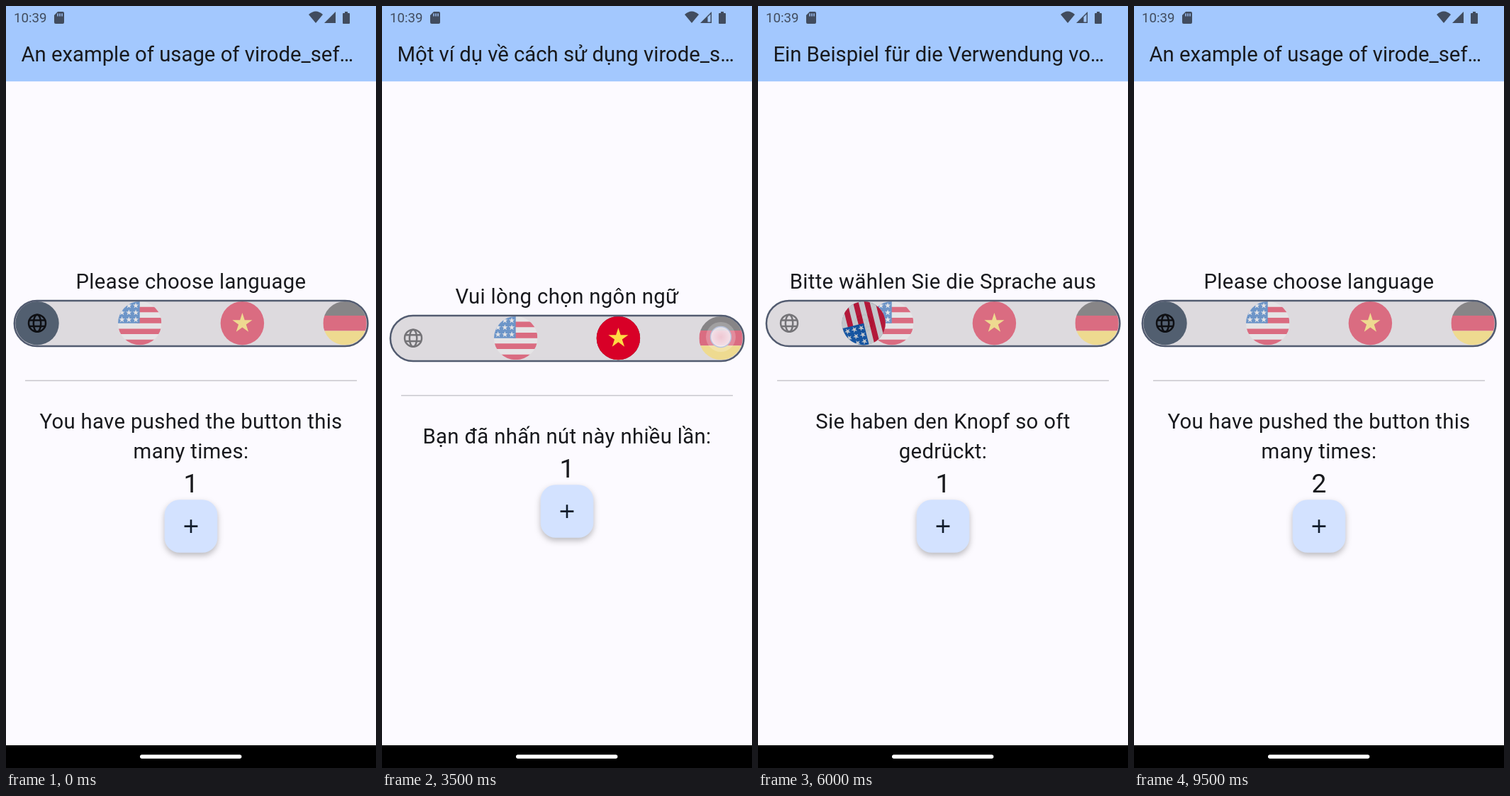
An HTML page for the animation above (9600 ms loop, 522 px wide and 1073 px high).

```html
<!DOCTYPE html>
<html lang="en">
<head>
<meta charset="utf-8">
<title>Language switch</title>
<style>
  html, body { margin: 0; width: 100%; height: 100%; overflow: hidden; background: #fcfaff; }
  svg { display: block; width: 100vw; height: 100vh; }
  text { font-family: Roboto, sans-serif; fill: #18191d; white-space: pre; }
  .body { font-size: 29.3px; letter-spacing: .333px; text-anchor: middle; }
  #title { font-size: 29.3px; }
  #count { font-size: 37.3px; text-anchor: middle; }
  #clock { font-size: 18.65px; fill: #414c5e; }
  #button { filter: drop-shadow(0 4px 4px rgba(0, 0, 0, .26)); }
</style>
</head>
<body>
<svg viewBox="0 0 522 1073">
  <defs>
    <clipPath id="disc"><circle cx="256" cy="256" r="256"/></clipPath>
    <radialGradient id="glow">
      <stop offset="0" stop-color="#f6e6ee" stop-opacity=".65"/>
      <stop offset="1" stop-color="#f6f2f8" stop-opacity=".85"/>
    </radialGradient>
    <path id="star" fill="#eee" d="m-22 31 57-41h-70l57 41-22-67z"/>
    <g id="globe" fill="none" stroke="#0e0f13" stroke-width="2.5">
      <circle r="12"/><ellipse rx="5.2" ry="12"/><path d="M-11.5-4.3h23M-11.5 4.3h23"/>
    </g>
    <g id="us" transform="scale(.12) translate(-256 -256)"><g clip-path="url(#disc)">
      <path fill="#eee" d="M0 0h512v512H0z"/>
      <path fill="#d80027" d="M224 64h288v64H224zm0 128h288v64H224zM0 320h512v64H0zm0 128h512v64H0z"/>
      <path fill="#0052b4" d="M0 0h256v256H0z"/>
      <g id="stars"></g>
    </g></g>
    <g id="vi" transform="scale(.12) translate(-256 -256)">
      <circle cx="256" cy="256" r="256" fill="#d80027"/>
      <path fill="#ffda44" d="m256 133.6 27.6 85H373L300.7 271l27.6 85-72.3-52.5-72.3 52.6 27.6-85-72.3-52.6h89.4z"/>
    </g>
    <g id="de" transform="scale(.12) translate(-256 -256)"><g clip-path="url(#disc)">
      <path fill="#333" d="M0 0h512v170H0z"/>
      <path fill="#d80027" d="M0 167h512v178H0z"/>
      <path fill="#ffda44" d="M0 345h512v167H0z"/>
    </g></g>
  </defs>

  <rect width="522" height="1073" fill="#fcfaff"/>
  <rect width="522" height="106.2" fill="#a3c8fe"/>
  <text id="clock" x="11" y="23">10:39</text>
  <g fill="#414c5e">
    <path d="M73 8h7q2 0 2 2v13q0 2-2 2H70q-2 0-2-2V13z"/>
    <path d="M437 24 427 12q10-9 20 0z"/>
    <path d="M465 8v16h-16z"/>
    <path d="M478 8h4v2h2q1 0 1 1v13q0 1-1 1h-8q-1 0-1-1V11q0-1 1-1h2z"/>
  </g>
  <path stroke="#a3c8fe" stroke-width="1.4" d="M73 10.5v4M76 10.5v4M79 10.5v4"/>
  <path id="weak" fill="#a3c8fe" d="m459.5 15.5 4-4v11h-4z"/>
  <text id="title" x="21.4" y="78.4"></text>

  <g id="upper">
    <text id="prompt" class="body" x="261" y="398"></text>
    <rect x="11.8" y="415" width="498.6" height="64" rx="32" fill="#dddade"/>
    <g id="slots" opacity=".5"></g>
    <g id="thumb"><circle r="30.7" fill="#525f70"/></g>
    <rect x="11.8" y="415" width="498.6" height="64" rx="32" fill="none" stroke="#525b70" stroke-width="2.5"/>
    <path stroke="#c7c5cc" stroke-width="1.4" d="M27 527.5h468"/>
    <text id="line1" class="body" x="261" y="595.2"></text>
    <text id="line2" class="body" x="261" y="637.1"></text>
  </g>
  <g id="lower">
    <text id="count" x="261" y="684.7"></text>
    <rect id="button" x="223.7" y="695.2" width="74.6" height="74.6" rx="21.3" fill="#d3e2ff"/>
    <rect id="press" x="223.7" y="695.2" width="74.6" height="74.6" rx="21.3" fill="#001c3a"/>
    <path stroke="#101c2b" stroke-width="2.6" d="M251.6 732.6h18.8M261 723.2v18.8"/>
  </g>

  <g id="touch">
    <circle r="21" fill="#fff" fill-opacity=".22"/>
    <circle r="14.5" fill="url(#glow)" stroke="#b9c4de" stroke-width="1.4"/>
  </g>
  <rect y="1041" width="522" height="32"/>
  <rect x="189" y="1054.3" width="143.4" height="5.4" rx="2.7" fill="#fff"/>
</svg>

<script>
const LOOP = 9600, STEP = 100, TRAVEL = 500, SLOT_X = 44, GAP = 144.7, SLOT_Y = 446.7, ROLL_RADIUS = 21.8;
const LINE_SHIFT = 20.95; // half a text line
const ICONS = ['globe', 'us', 'vi', 'de'];
const TEXT = {
  en: ['An example of usage of virode_sef…', 'Please choose language',
       'You have pushed the button this', 'many times:'],
  vi: ['Một ví dụ về cách sử dụng virode_s…', 'Vui lòng chọn ngôn ngữ',
       'Bạn đã nhấn nút này nhiều lần:', ''],
  de: ['Ein Beispiel für die Verwendung vo…', 'Bitte wählen Sie die Sprache aus',
       'Sie haben den Knopf so oft', 'gedrückt:']
};
// at: time of the tap, to: chosen slot, x and y: finger position
const TAPS = [
  { at: 1401, to: 1, lang: 'en', x: 188, y: 446 },
  { at: 2500, to: 2, lang: 'vi', x: 334, y: 446 },
  { at: 3590, to: 3, lang: 'de', x: 478, y: 466 },
  { at: 4734, to: 0, lang: 'en', x: 55, y: 444 },
  { at: 5801, to: 3, lang: 'de', x: 478, y: 446 },
  { at: 7501, to: 0, lang: 'en', x: 50, y: 446 }
];
const PLUS = { at: 8800, x: 261, y: 733 };

const $ = id => document.getElementById(id);
const clamp = v => Math.min(1, Math.max(0, v));

function addUse(parent, id, transform) {
  const use = document.createElementNS('http://www.w3.org/2000/svg', 'use');
  use.setAttribute('href', '#' + id);
  if (transform) use.setAttribute('transform', transform);
  return $(parent).appendChild(use);
}
const slotX = i => SLOT_X + GAP * i;
for (const x of [47, 128, 209])
  for (const y of [48, 130, 212]) addUse('stars', 'star', `translate(${x} ${y})`);
ICONS.forEach((id, i) => addUse('slots', id, `translate(${slotX(i)} ${SLOT_Y})`));
const faces = ICONS.map(id => addUse('thumb', id));

const bezier = (s, a, b) => 3 * (1 - s) ** 2 * s * a + 3 * (1 - s) * s * s * b + s ** 3;
function ease(u) {
  let low = 0, high = 1;
  for (let i = 0; i < 24; i++) {
    const mid = (low + high) / 2;
    if (bezier(mid, .785, .15) < u) low = mid; else high = mid;
  }
  return bezier(low, .135, .86);
}

function setText(id, value) {
  if ($(id).textContent !== value) $(id).textContent = value;
}
const set = (id, name, value) => $(id).setAttribute(name, value);

function draw(t) {
  let pos = 0, lang = 'en';
  for (const tap of TAPS) {
    if (t < tap.at) break;
    pos += (tap.to - pos) * ease(clamp((t - tap.at) / TRAVEL));
    lang = tap.lang;
  }

  ['title', 'prompt', 'line1', 'line2'].forEach((id, i) => setText(id, TEXT[lang][i]));
  setText('count', t < PLUS.at ? '1' : '2');
  const shift = lang === 'vi' ? LINE_SHIFT : 0;
  set('upper', 'transform', `translate(0 ${shift})`);
  set('lower', 'transform', `translate(0 ${-shift})`);
  set('weak', 'opacity', t >= 500 && t < 8600 ? 1 : 0);

  // The dark thumb rolls along the track while neighbouring icons cross-fade on it.
  set('thumb', 'transform', `translate(${slotX(pos)} ${SLOT_Y})`);
  faces.forEach((face, i) => {
    const turn = (pos - i) * GAP / ROLL_RADIUS * 180 / Math.PI;
    face.setAttribute('transform', `rotate(${turn})`);
    face.setAttribute('opacity', clamp(1 - Math.abs(pos - i)));
  });

  const finger = [...TAPS, PLUS].find(p => t > p.at - 130 && t < p.at + 130);
  set('touch', 'opacity', finger ? clamp(1 - (t - finger.at) / 130) : 0);
  if (finger) set('touch', 'transform', `translate(${finger.x} ${finger.y})`);
  const held = t - PLUS.at;
  set('press', 'opacity', held < -130 ? 0 : .1 * clamp(1 - held / 350));
}

function tick() {
  const t = performance.now() % LOOP;
  draw(Math.floor(t / STEP) * STEP);
  requestAnimationFrame(tick);
}
tick();
</script>
</body>
</html>
```
